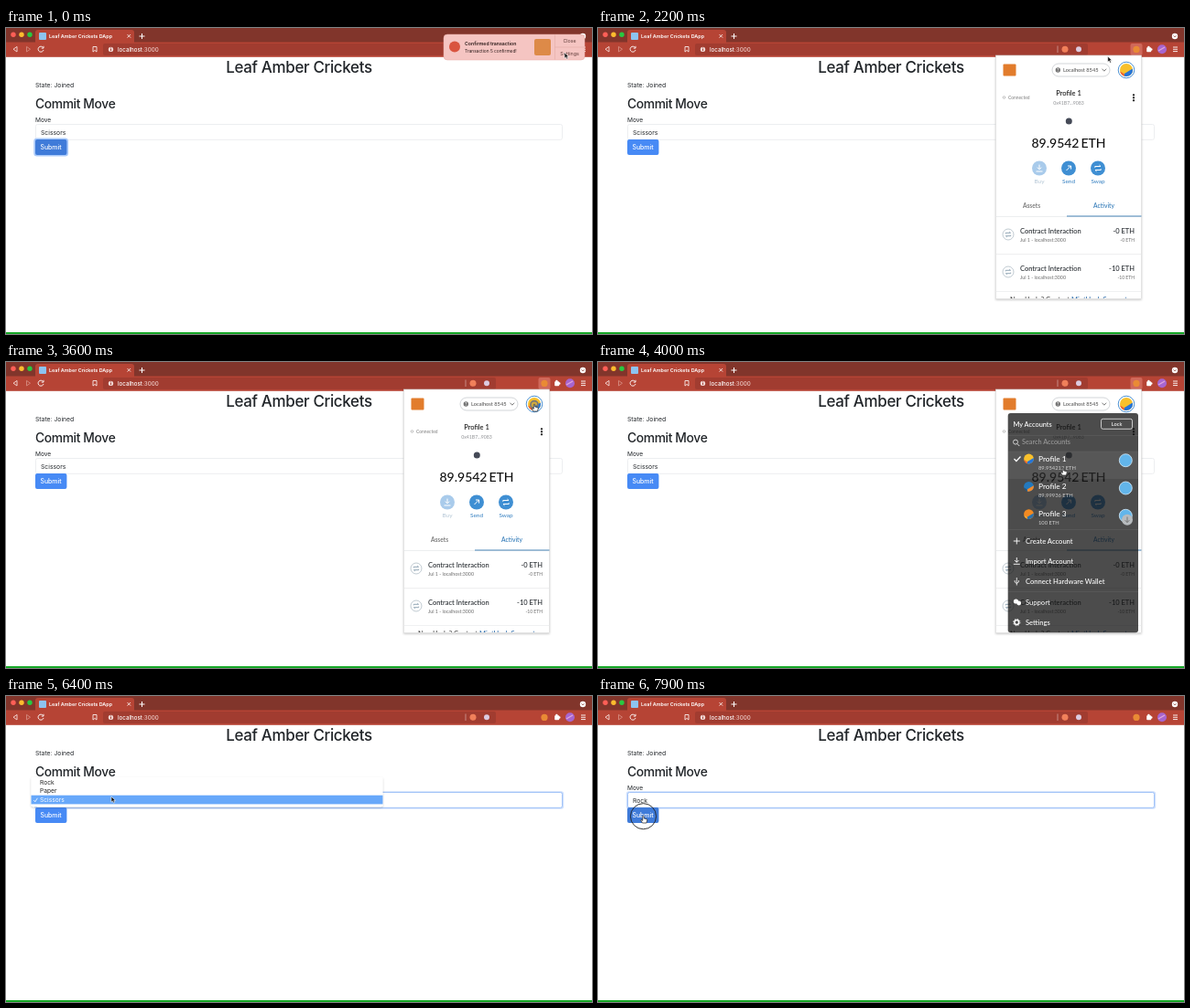
An HTML page for the animation above (8000 ms loop, 640 by 335 pixels).

```html
<!DOCTYPE html>
<html lang="en">
<head>
<meta charset="utf-8">
<title>Wallet demo</title>
<style>
html, body { margin: 0; width: 100%; height: 100%; overflow: hidden; background: #fff; }
svg { display: block; width: 100vw; height: 100vh; font-family: Inter, Roboto, sans-serif; fill: #212529; }
.wallet { font-family: Lato, "Open Sans", sans-serif; font-weight: 500; }
text { white-space: pre; }
</style>
</head>
<body>
<svg id="stage" viewBox="0 0 640 335"></svg>
<script>
const LOOP = 8000;
const attrs = o => Object.entries(o).map(([k, v]) => ` ${k}="${v}"`).join('');
const rect = (x, y, width, height, fill, more = {}) => `<rect${attrs({ x, y, width, height, fill, ...more })}/>`;
const dot = (cx, cy, r, fill, more = {}) => `<circle${attrs({ cx, cy, r, fill, ...more })}/>`;
const line = (d, stroke, width = 1, more = {}) =>
  `<path${attrs({ d, stroke, fill: 'none', 'stroke-width': width, ...more })}/>`;
const text = (x, y, s, size, fill = '#212529', more = {}) =>
  `<text${attrs({ x, y, 'font-size': size, fill, ...more })}>${s}</text>`;
const group = (id, body, more = {}) => `<g${attrs({ id, ...more })}>${body}</g>`;
const mid = { 'text-anchor': 'middle' }, end = { 'text-anchor': 'end' };
const medium = { 'font-weight': 500 };

function browser() {
  return rect(0, 0, 640, 16, '#81352b') + rect(0, 15.5, 640, 16.3, '#b64435') +
    ['#ff5f57', '#febc2e', '#28c840'].map((c, i) => dot(8 + 9 * i, 7.3, 2.7, c)).join('') +
    rect(32, 2, 108, 17, '#b64435', { rx: 3 }) + rect(36, 5, 8, 8, '#8dc3f0', { rx: 1 }) +
    text(47, 11.2, 'Leaf Amber Crickets DApp', 5.4, '#fff', { 'font-weight': 600 }) +
    line('M132.5 7l3.6 3.6m0-3.6l-3.6 3.6', '#fff', .8) +
    line('M145.5 9h6M148.5 6v6', '#fff', 1) +
    dot(630, 9, 3.2, '#fff') + line('M628.6 8.4l1.4 1.5 1.4-1.5', '#81352b', .8) +
    line('M12 20.4v5.6l-4-2.8z', '#f6deda', .9) +
    line('M22.5 20.4v5.6l4-2.8z', '#d58c81', .9) +
    line('M40.6 21.5a3 3 0 1 0 .4 2.5M41 19.8v2.3h-2.3', '#fff', .9) +
    line('M95 20.5h4v5.6l-2-1.7-2 1.7z', '#fff', .8) +
    rect(106, 17, 429, 13, '#a13c30', { rx: 2 }) +
    dot(114.5, 23.4, 2.7, '#efd5d1') + rect(114.1, 22.9, .9, 2.2, '#a13c30') + rect(114.1, 21.4, .9, .9, '#a13c30') +
    text(122, 25.8, 'localhost<tspan fill="#ecc8c3">:3000</tspan>', 6.2, '#fff', medium) +
    line('M502 19.5v7.5', '#d3a09a', .8) +
    dot(510, 23.3, 3.5, '#f0805a') + dot(525, 23.3, 3, '#dccbe0') +
    rect(581.5, 17, 13, 13, '#d0685a', { id: 'pressed', rx: 2 }) + dot(588, 23.4, 3.6, '#e98a35') +
    rect(599.2, 21.2, 5, 5, '#fff', { rx: .8 }) + dot(601.4, 20.9, 1.2, '#fff') + dot(604.3, 23.5, 1.2, '#fff') +
    dot(616, 23.3, 5, '#a765cf') + line('M612 25l7-4', '#e0a5dc', 1.4) +
    line('M628 21h5M628 23.3h5M628 25.6h5', '#fff', .9);
}

function page() {
  return text(320, 49.3, 'Leaf Amber Crickets', 17, '#212529', { ...mid, ...medium, 'letter-spacing': -.35 }) +
    text(32, 64.8, 'State: Joined', 6.8) +
    text(32, 88.4, 'Commit Move', 13.8, '#212529', { ...medium, 'letter-spacing': -.35 }) +
    text(32, 102.8, 'Move', 6.6) +
    rect(30.8, 104.2, 578.4, 19.6, '#cfe0fc', { id: 'selectGlow', rx: 3 }) +
    rect(32.5, 105.5, 575, 16.8, '#fff', { id: 'select', rx: 2, 'stroke-width': .8 }) +
    text(38, 116.5, '', 6.8, '#212529', { id: 'value' }) +
    rect(30.3, 120.4, 37.8, 20.2, '#a9c9fa', { id: 'buttonGlow', rx: 3.5 }) +
    rect(32, 122, 34.4, 17, '', { id: 'button', rx: 2 }) +
    text(49, 133.2, 'Submit', 6.9, '#fff', { ...mid, ...medium }) +
    rect(0, 333, 640, 2, '#16a826');
}

function notice() {
  return rect(478, 7, 154, 28, '#f5c5c2', { rx: 4, stroke: '#e5aaa5', 'stroke-width': .5 }) +
    dot(490, 20.5, 6, '#d9543f') +
    text(501, 18.5, 'Confirmed transaction', 5.2, '#2b1a19', { 'font-weight': 600 }) +
    text(501, 26.6, 'Transaction 5 confirmed!', 4.8, '#2b1a19') +
    rect(577, 12, 18, 18, '#dd8a48', { rx: 2 }) +
    line('M599.5 7.5v27M599.5 21h32', '#e2aaa6', .6) +
    text(615.5, 16.2, 'Close', 5.3, '#5c3835', mid) + text(615.5, 30, 'Settings', 5.3, '#5c3835', mid);
}

// Round avatar: base colour with a crescent and a small segment
const avatar = (x, y, r, [base, crescent, segment]) => `<g transform="translate(${x} ${y}) scale(${r})">` +
  dot(0, 0, 1, base) + `<path d="M.98-.2L-.35 .6L-.3 .95A1 1 0 0 0 .98-.2z" fill="${crescent}"/>` +
  `<path d="M-.97 .2L-.35 .6L-.3 .95A1 1 0 0 1-.97 .2z" fill="${segment}"/></g>`;
const looks = [['#f8c02c', '#2575d8', '#ee5d32'], ['#2479bd', '#f18a2c', '#1d5688'], ['#f28a22', '#2b70aa', '#f5ad36']];

const swapArrows = (x, y, c, s) => line('M-3.2-.7V-2H3L1.5-3.4M3.2.7V2H-3L-1.5 3.4', c, 1,
  { transform: `translate(${x} ${y}) scale(${s})` });

function activity(y, name, amount) {
  return dot(448, y + 4, 6, '#fff', { stroke: '#a5b3bd', 'stroke-width': .7 }) + swapArrows(448, y + 4, '#7f97a8', .85) +
    text(461, y + 3.3, name, 7.5, '#24292e') + text(586, y + 3.3, amount, 7.5, '#24292e', end) +
    text(461, y + 12, 'Jul 1 - localhost:3000', 5.3, '#777') + text(586, y + 12, amount, 5, '#777', end);
}

function account(n, address, balance) {
  return avatar(577, 46, 7, looks[n - 1]) + text(514, 74.3, 'Profile ' + n, 7.5, '#111', mid) +
    text(514, 83.7, address, 5.2, '#989a9d', mid) +
    text(514, 131, balance + ' ETH', 14, '#111', { ...mid, 'word-spacing': -1.6 });
}

function popup() {
  const actions = ['Buy', 'Send', 'Swap'].map((s, i) => {
    const x = 482 + 32 * i;
    return dot(x, 153.5, 8, i ? '#3f8fd3' : '#a9cbeb') +
      text(x, 170.2, s, 6.4, i ? '#3f86c4' : '#b8c9d8', mid);
  }).join('');
  const help = text(514, 285.3, 'Need help? Contact <tspan fill="#2b6cab">MintHusk Support</tspan>', 7.5, '#444', mid);
  return rect(434.5, 30, 159, 266.5, '#fff', { stroke: '#d6d6d6', 'stroke-width': .6, filter: 'url(#soft)' }) +
    rect(442.5, 39.5, 14, 13, '#e27c2c', { rx: 1 }) +
    rect(496, 39, 63, 14, '#fff', { rx: 7, stroke: '#bfc3c7', 'stroke-width': .7 }) +
    dot(502.3, 46, 2.7, '#777') + text(502.3, 47.8, '?', 4.6, '#fff', mid) +
    text(508, 48, 'Localhost 8545', 5.7, '#555') + line('M550.5 44.7l2.3 2.5 2.3-2.5', '#555', .8) +
    dot(577, 46, 8.8, '#fff', { stroke: '#3b86cc', 'stroke-width': .9 }) +
    dot(443.5, 76, 1.3, '#fff', { stroke: '#999', 'stroke-width': .6 }) + text(448, 77.8, 'Connected', 4.9, '#888') +
    [73.3, 76.3, 79.3].map(y => dot(585, y, 1.15, '#111')).join('') +
    dot(514.3, 102, 3.5, '#454a57') + actions +
    line('M482 149.6v5M479.8 152.6l2.2 2.2 2.2-2.2M478.5 157h7', '#fff', 1) +
    line('M511.5 156l5-5M513 151h3.6v3.6', '#fff', 1) + swapArrows(546, 153.5, '#fff', 1) +
    text(473.5, 197, 'Assets', 6.7, '#666', mid) + text(552.5, 197, 'Activity', 6.7, '#2e78b7', mid) +
    line('M434.5 206.5h159', '#e0e2e4', .6) + line('M512 206h81.5', '#4a86b8', 1.2) +
    group('first', account(1, '0x41B7...9083', '89.9542') +
      activity(222, 'Contract Interaction', '-0 ETH') + line('M434.5 247.7h159', '#dfe1e3', .6) +
      activity(263, 'Contract Interaction', '-10 ETH') + line('M434.5 288.5h159', '#e6e8ea', .6) +
      `<g clip-path="url(#panel)"><g transform="translate(0 15)">${help}</g></g>`) +
    group('second', account(2, '0x7DEa...31B6', '89.9994') + activity(222, 'Join Game', '-10 ETH') + help);
}

function menu() {
  const rows = ['89.954212 ETH', '89.99936 ETH', '100 ETH'].map((sum, i) => {
    const y = 106 + 30.3 * i;
    return avatar(470.5, y, 5.4, looks[i]) + text(481, y + 2.8, 'Profile ' + (i + 1), 8.3, '#fff') +
      text(481, y + 11.7, sum, 5.8, '#c8c8c8') + dot(576.3, y + 1.7, 7, '#62b5ea', { stroke: '#d7edfa', 'stroke-width': .8 });
  }).join('');
  const items = [['Create Account', 196], ['Import Account', 218], ['Connect Hardware Wallet', 240.3],
    ['Support', 263], ['Settings', 285]].map(([s, y]) => text(467, y + 2.6, s, 7.6, '#fff')).join('');
  const rules = [80.5, 98, 183.5, 251.5].map(y => `M448 ${y}h142`).join('');
  return rect(447.7, 56, 142.3, 240.3, 'rgba(20,20,20,.76)', { rx: 3 }) +
    rect(447.7, 0, 142.3, 30, 'rgba(255,255,255,.06)', { id: 'hover' }) +
    line(rules, '#5f5f5f', .6) +
    text(453.5, 70.7, 'My Accounts', 7.4, '#fff') +
    rect(549.5, 62.3, 34, 11, 'none', { rx: 2, stroke: '#fff', 'stroke-width': .7 }) +
    text(566.5, 70, 'Lock', 5.7, '#fff', mid) +
    line('M457.8 89.5l2.5 2.5', '#ddd', 1) + dot(456, 87.6, 2.5, 'none', { stroke: '#ddd', 'stroke-width': .9 }) +
    text(463, 90.4, 'Search Accounts', 7.3, '#9a9a9a') + rows +
    line('M454.5 106l2.4 2.5 4.6-5', '#fff', 1.2) +
    dot(578, 172.8, 6, '#b7bbbe') + line('M578 169.5v6M575.6 173.2l2.4 2.4 2.4-2.4', '#666', .8) + items +
    line('M457.3 192.5v7M453.8 196h7', '#fff', .9) +
    line('M457.3 214v5M455 217l2.3 2.3 2.3-2.3M453.8 221.3h7', '#fff', .9) +
    line('M457.3 236v8.5M455.2 239v2l2.1 1.4 2.1-1.4v-2', '#fff', .8) +
    dot(456.5, 262, 2.6, '#fff') + dot(459.7, 264, 2.4, '#fff') +
    dot(457.3, 285, 2.4, 'none', { stroke: '#fff', 'stroke-width': 1.5 }) +
    dot(457.3, 285, 3.7, 'none', { stroke: '#fff', 'stroke-width': .8, 'stroke-dasharray': '1.5 1.4' });
}

const options = ['Rock', 'Paper', 'Scissors'];
const dropdown = () => rect(27.5, 88.8, 384, 32.4, '#fff', { rx: 2, filter: 'url(#soft)' }) +
  rect(27.5, 0, 384, 9.7, '#67a8fa', { id: 'row' }) +
  options.map((s, i) => text(37, 96.7 + 9.7 * i, s, 6.7, '', { id: 'option' + i })).join('') +
  line('M30.3 114l1.5 1.8 2.6-4', '#fff', .8, { id: 'tick' });

const outline = { stroke: '#fff', 'stroke-width': .6 };
const pointer = group('arrow', `<path${attrs({ d: 'M0 0v6.2l1.5-1.3 1 2.2 1.2-.5-1-2.2h1.9z', fill: '#111', ...outline })}/>`) +
  group('hand', `<path${attrs({
    d: 'M-.7 .5Q0-.4.7.5V3L3.6 3.7Q4.4 4 4.2 5L3.5 8H-1L-2.8 5Q-2.5 4.1-1.6 4.7L-.7 5.4z',
    fill: '#fff', stroke: '#222', 'stroke-width': .7 })}/>`);

stage.innerHTML = `<defs><filter id="soft" x="-10%" y="-20%" width="120%" height="140%">
  <feDropShadow dx="0" dy="1" stdDeviation="1.3" flood-opacity=".22"/></filter>
  <clipPath id="panel"><rect x="434" y="289" width="160" height="7"/></clipPath></defs>` +
  rect(0, 0, 640, 335, '#fff') + page() + browser() + group('notice', notice()) +
  group('popup', popup(), { class: 'wallet' }) + group('menu', menu(), { class: 'wallet' }) +
  group('dropdown', dropdown()) + dot(0, 0, 1, '#777', { id: 'ring' }) + group('pointer', pointer);

const $ = id => document.getElementById(id);
const show = (id, on) => $(id).setAttribute('display', on ? 'inline' : 'none');
const set = (id, o) => { for (const k in o) $(id).setAttribute(k, o[k]); };
const clamp = v => Math.max(0, Math.min(1, v));
const ease = v => v * v * (3 - 2 * v);

// Pointer stops: time, x, y
const path = [[0, 610, 27], [250, 614, 14], [450, 614, 14], [1050, 587.5, 21], [1800, 587.5, 21], [2700, 514, 45],
  [2950, 514, 45], [3450, 577, 46], [3700, 577, 46], [4000, 508, 116], [4350, 500, 137], [4600, 500, 137],
  [5050, 218, 126.5], [5600, 218, 126.5], [5950, 115, 110], [6450, 115, 110], [7000, 62, 94], [7200, 62, 94],
  [7600, 49.5, 131], [8000, 49.5, 131]];
const clicks = [1100, 3600, 4450, 5450, 6000, 7080, 7700];

function position(t) {
  const i = path.findIndex(p => p[0] > t);
  const [a, b] = [path[i - 1], path[i]], k = ease((t - a[0]) / (b[0] - a[0]));
  return [a[1] + (b[1] - a[1]) * k, a[2] + (b[2] - a[2]) * k];
}

function draw(t) {
  const between = (a, b) => t >= a && t < b;
  const [x, y] = position(t);

  show('notice', t < 750);
  set('notice', { transform: `translate(${165 * ease(clamp((t - 350) / 400))} 0)` });
  show('pressed', between(1300, 5600));
  show('popup', between(1900, 5600));
  show('first', t < 4600);
  show('second', t >= 4600);
  show('menu', between(3700, 4600));
  const account = Math.floor((y - 97) / 30);
  show('hover', account >= 0 && account < 3);
  set('hover', { y: 98 + 29 * account });

  const open = between(6100, 7150);
  const picked = Math.max(0, Math.min(2, Math.floor((y - 89) / 9.7)));
  show('dropdown', open);
  set('row', { y: 89.3 + 9.7 * picked });
  options.forEach((_, i) => set('option' + i, { fill: i === picked ? '#fff' : '#222' }));
  set('tick', { stroke: picked === 2 ? '#fff' : '#222' });
  show('selectGlow', t >= 6100);
  set('select', { stroke: t >= 6100 ? '#8fb7f6' : '#e8eaec' });
  $('value').textContent = t < 7150 ? 'Scissors' : 'Rock';

  const focused = t < 1750, overButton = x > 32 && x < 66 && y > 122 && y < 139;
  show('buttonGlow', focused);
  set('button', { fill: focused || overButton ? '#3f7bd9' : '#478af5' });

  const click = clicks.find(c => between(c, c + 320));
  show('ring', click);
  if (click) {
    const age = t - click;
    set('ring', { cx: x, cy: y + .7, r: 4 + age * .05, stroke: age < 150 ? '#777' : '#222',
      'stroke-width': age < 150 ? 1.7 : .9, 'fill-opacity': .3 * clamp(1 - age / 180), opacity: clamp((320 - age) / 100) });
  }
  const hand = between(2500, 4650) || overButton;
  show('arrow', !hand);
  show('hand', hand);
  set('pointer', { transform: `translate(${x} ${y})` });
}

function tick() {
  draw(performance.now() % LOOP);
  requestAnimationFrame(tick);
}
tick();
</script>
</body>
</html>
```
